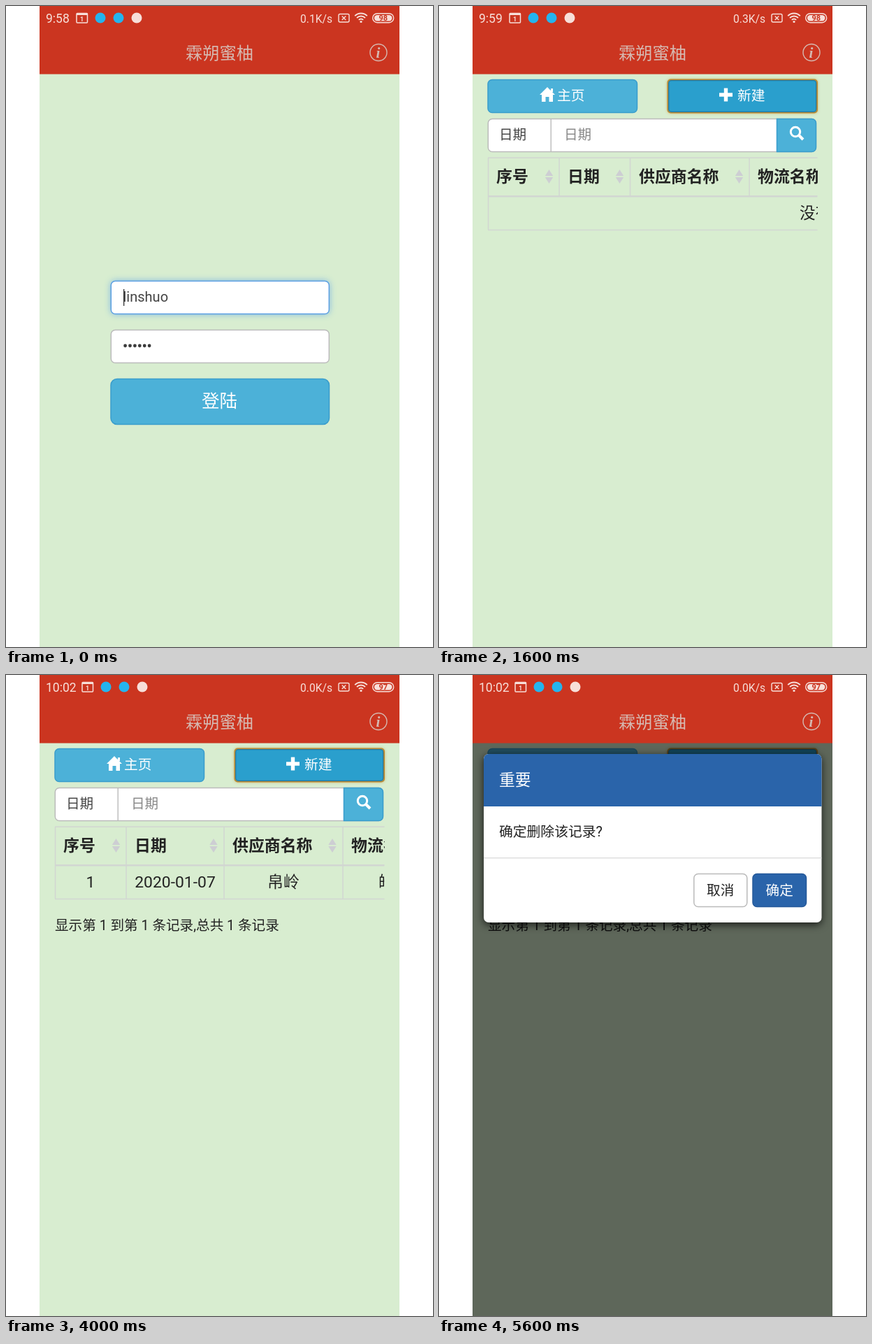
Write an HTML page with a canvas that moves like this. It is 611x917 px and loops after 6400 ms.

```html
<!DOCTYPE html>
<html lang="zh-CN">
<head>
<meta charset="utf-8">
<style>
  html, body { margin: 0; width: 100%; height: 100%; overflow: hidden; background: #fff; }
  canvas { display: block; width: 611px; height: 917px; }
</style>
</head>
<body>
<canvas id="stage" width="611" height="917"></canvas>
<script>
const ctx = document.getElementById('stage').getContext('2d');
const FONT = 'Roboto, "Noto Sans CJK SC", "Noto Sans CJK", sans-serif';
const RED = '#cb3520', PAGE = '#d8edd0', SKY = '#4cb1d8', SKY_EDGE = '#3a9dcc';
const BLUE = '#2a64aa', INK = '#222', SOFT = '#444', GRAY = '#bbb', GRID = '#d2d6d2';
const ERROR = '#933033', VALID = '#2b672c', STATUS = '#f7dfd9', TITLE = '#d6b9b1';
const STEP = 800;

// Text is placed by its vertical middle.
function text(str, x, cy, size, color = INK, { weight = 400, align = 'left' } = {}) {
  ctx.font = `${weight} ${size}px ${FONT}`;
  ctx.textAlign = align;
  ctx.fillStyle = color;
  ctx.fillText(str, x, cy + size * 0.37);
}
const centered = (str, x, cy, size, color, weight) =>
  text(str, x, cy, size, color, { weight, align: 'center' });

function rect(x, y, w, h, color) {
  ctx.fillStyle = color;
  ctx.fillRect(x, y, w, h);
}

function line(color, width, ...points) {
  ctx.strokeStyle = color;
  ctx.lineWidth = width;
  ctx.beginPath();
  points.forEach(([x, y]) => ctx.lineTo(x, y));
  ctx.stroke();
}

function shape(color, ...points) {
  ctx.fillStyle = color;
  ctx.beginPath();
  points.forEach(([x, y]) => ctx.lineTo(x, y));
  ctx.fill();
}

function disc(x, y, r, color) {
  ctx.fillStyle = color;
  ctx.beginPath();
  ctx.arc(x, y, r, 0, 7);
  ctx.fill();
}

function ring(x, y, r, color, width, from = 0, to = Math.PI * 2) {
  ctx.strokeStyle = color;
  ctx.lineWidth = width;
  ctx.beginPath();
  ctx.arc(x, y, r, from, to);
  ctx.stroke();
}

function box(x, y, w, h, r, fill, { edge, width = 1.5, glow, blur = 10, dy = 0 } = {}) {
  ctx.save();
  ctx.beginPath();
  ctx.roundRect(x, y, w, h, r);
  if (glow) Object.assign(ctx, { shadowColor: glow, shadowBlur: blur, shadowOffsetY: dy });
  if (fill) {
    ctx.fillStyle = fill;
    ctx.fill();
  }
  ctx.shadowColor = 'transparent';
  if (edge) {
    ctx.strokeStyle = edge;
    ctx.lineWidth = width;
    ctx.stroke();
  }
  ctx.restore();
}

function at(x, y, draw) {
  ctx.save();
  ctx.translate(x, y);
  draw();
  ctx.restore();
}

// Icons, drawn around their centre
const icons = {
  home() {
    shape('#fff', [0, -11], [11, 0], [8, 0], [8, 10], [2.5, 10], [2.5, 3], [-2.5, 3],
      [-2.5, 10], [-8, 10], [-8, 0], [-11, 0]);
    rect(5, -9, 3, 5, '#fff');
  },
  plus() {
    rect(-9.5, -2.7, 19, 5.4, '#fff');
    rect(-2.7, -9.5, 5.4, 19, '#fff');
  },
  search() {
    ring(-2, -2, 6.7, '#fff', 3);
    line('#fff', 4, [3, 3], [9, 9]);
  },
  cross(color, r, width) {
    line(color, width, [-r, -r], [r, r]);
    line(color, width, [-r, r], [r, -r]);
  },
  check() {
    line(VALID, 5.5, [-8.5, 0.5], [-3, 5.5], [8.5, -6]);
  },
  sort() {
    shape('#cdced3', [0, -10], [5.7, -1], [-5.7, -1]);
    shape('#cdced3', [0, 10], [5.7, 1], [-5.7, 1]);
  },
  pencil() {
    shape(BLUE, [-11, 11], [-9, 4], [-4, 9]);
    shape(BLUE, [-7.5, 2.5], [3, -7], [7, -3], [-2.5, 7.5]);
    shape(BLUE, [4.5, -8.5], [7, -11], [11.5, -6.5], [8.5, -4]);
  },
  trash() {
    box(-3.5, -11.5, 7, 4, 1, null, { edge: BLUE, width: 2 });
    rect(-10.5, -9, 21, 2.4, BLUE);
    box(-7.5, -6, 15, 17.5, 1, null, { edge: BLUE, width: 2.2 });
    for (const x of [-3.7, 0, 3.7]) rect(x - 0.8, -4, 1.6, 13, BLUE);
  },
};

function statusBar(clock, speed, battery) {
  const shift = { '10:01': 6, '10:02': 8 }[clock] || 0;
  text(clock, 57, 17.5, 17.5, STATUS);
  box(101 + shift, 10.5, 15.5, 13.5, 1, null, { edge: STATUS });
  rect(101 + shift, 10, 15.5, 3, STATUS);
  centered('1', 108.7 + shift, 18.7, 9, STATUS, 700);
  disc(135 + shift, 17, 7.5, '#25b4ee');
  disc(161 + shift, 17, 7.5, '#25b4ee');
  disc(187 + shift, 17, 7.5, STATUS);

  text(speed, 467, 17.8, 15.6, STATUS, { align: 'right' });
  box(476, 11.5, 15, 11.5, 2, null, { edge: STATUS, width: 1.4 });
  at(483.5, 17.2, () => icons.cross(STATUS, 2.7, 1.4));
  for (const r of [4.5, 8.5, 12.5])
    ring(508, 23, r, STATUS, 1.8, -Math.PI * 0.75, -Math.PI * 0.25);
  disc(508, 22.5, 1.6, STATUS);
  box(524.7, 10.7, 30, 13, 6.5, null, { edge: STATUS, width: 1.4 });
  box(527, 13, 25.4, 8.4, 4.2, STATUS);
  centered(battery, 539.7, 17.2, 11, RED, 700);
}

function header(clock, speed, battery) {
  rect(48, 0, 515, 97.5, RED);
  statusBar(clock, speed, battery);
  centered('霖朔蜜柚', 305.5, 67, 24.2, TITLE, 300);
  ring(533, 66.5, 12, TITLE, 1.4);
  ctx.font = 'italic 700 21px "Liberation Serif", serif';
  ctx.textAlign = 'center';
  ctx.fillStyle = TITLE;
  ctx.fillText('i', 532.5, 73.5);
}

function bigButton(label, y) {
  box(150, y + 0.5, 312.5, 65, 9, SKY, { edge: SKY_EDGE });
  centered(label, 305.5, y + 32, 25.5, '#fff', 300);
}

function login() {
  box(150.3, 393.5, 312, 47, 6, '#fff', { edge: '#5b9fe3', glow: 'rgba(90,160,235,.8)' });
  text('linshuo', 167.5, 416, 20, SOFT);
  rect(168, 405, 1.3, 24, '#333');
  box(150.3, 463.5, 312, 47, 6, '#fff', { edge: GRAY });
  for (let i = 0; i < 6; i++) disc(170.6 + i * 6.9, 486, 2.4, '#3c3c3c');
  bigButton('登陆', 533);
}

function menu() {
  ['进货管理', '出货管理', '库存查询', '统计报表', '退出登陆']
    .forEach((label, i) => bigButton(label, 290 + i * 88));
}

function toolbar() {
  box(70, 105.5, 213.5, 47, 6, SKY, { edge: SKY_EDGE });
  at(155, 127, icons.home);
  text('主页', 169, 128, 19.8, '#fff');
  box(327.5, 105.5, 213.5, 47, 4, '#2a9fcd', { edge: '#b98a33', width: 2, glow: 'rgba(190,130,20,.8)', blur: 4 });
  box(328.7, 106.7, 211, 44.6, 4, null, { edge: '#2279a2', width: 1.2 });
  at(410.5, 127, icons.plus);
  text('新建', 427, 128, 19.8, '#fff');

  box(70.3, 161.5, 469, 47, 6, '#fff', { edge: GRAY });
  rect(159.5, 162, 1.4, 46, GRAY);
  text('日期', 86, 184, 19.6, SOFT);
  text('日期', 179, 184, 19.6, '#888');
  box(483.5, 161.5, 56, 47, [0, 6, 6, 0], SKY, { edge: SKY_EDGE });
  at(512, 182, icons.search);
}

// columns: [title, title x, sort arrow x or 0]
function table(columns, dividers, drawRow, rowDividers) {
  ctx.save();
  ctx.beginPath();
  ctx.rect(69, 215, 473, 108);
  ctx.clip();
  rect(70, 216.4, 471.5, 1.5, GRID);
  rect(70, 271, 471.5, 2.5, GRID);
  rect(70, 319.7, 471.5, 1.5, GRID);
  for (const x of dividers) rect(x - 0.7, 217, 1.5, rowDividers ? 103 : 55, GRID);
  if (!rowDividers) rect(69.8, 217, 1.5, 103, GRID);
  for (const [title, x, sortX] of columns) {
    text(title, x, 244, 22.9, INK, { weight: 700 });
    if (sortX) at(sortX, 244, icons.sort);
  }
  drawRow();
  ctx.restore();
}

const cell = (str, x) => centered(str, x, 296, 22.9, INK);
const summary = () => text('显示第 1 到第 1 条记录,总共 1 条记录', 70, 358, 19.6, INK);

function emptyList() {
  toolbar();
  table([['序号', 82, 157.5], ['日期', 184, 258.5], ['供应商名称', 286, 429.5], ['物流名称', 456, 0]],
    [172, 273.5, 444], () => text('没有找到匹配的记录', 516, 296, 22.5, INK));
}

function listStart() {
  toolbar();
  table([['序号', 82, 157.5], ['日期', 184, 297], ['供应商名称', 324, 467], ['物流名称', 494, 0]],
    [70.5, 172, 312, 482], () => {
      cell('1', 121);
      cell('2020-01-07', 242);
      cell('帛岭', 397);
      cell('皓舟', 556);
    }, true);
  summary();
}

function listEnd() {
  toolbar();
  table([['件数', 78, 153], ['净重', 180, 254.5], ['单价', 281.5, 356], ['合计', 383, 457.5], ['操作', 484, 0]],
    [167.5, 269, 370.5, 472, 541], () => {
      cell('658', 116.5);
      cell('3.5', 218);
      cell('4.6', 320);
      cell('0', 421);
      at(491, 294, icons.pencil);
      at(521.5, 293.5, icons.trash);
    }, true);
  summary();
}

const dim = () => rect(48, 97, 515, 820, 'rgba(0,0,0,.565)');

function sheet(y, h) {
  box(64, y, 483.5, h, 7, '#fff', { glow: 'rgba(0,0,0,.75)', blur: 12, dy: 3 });
}

function field(y, label, { tone, value = '', mark, help, focus, date } = {}) {
  if (label) text(label, 86, y - 27, 25.6, tone || INK, { weight: 700 });
  box(85.8, y + 0.7, 439.2, 47, 6, '#fff',
    { edge: focus ? '#1f4f22' : tone || GRAY, width: focus ? 1.9 : 1.6, glow: focus && 'rgba(80,170,80,.9)' });
  text(value, date ? 109.5 : 104, y + 24.5, 25.6, SOFT);
  if (focus) rect(103.6, y + 10, 1.5, 29, '#333');
  if (date) shape('#333', [508.5, y + 20], [517.5, y + 20], [513, y + 29]);
  if (mark === 'check') at(502, y + 24, icons.check);
  if (mark === 'cross') at(501.5, y + 23, () => icons.cross(ERROR, 6.5, 5.2));
  if (help) text('请填写必填项目', 86, y + 67, 16.9, ERROR);
}

const TAIL = ['件数', '净重(斤)', '单价(元/斤)'];

function formErrors() {
  dim();
  sheet(60, 880);
  const missing = { tone: ERROR, mark: 'cross', help: true };
  field(102, '', { ...missing, date: true });
  field(224, '供应商名称', missing);
  field(367, '物流名称', missing);
  field(489, '规格', { tone: ERROR });
  [602, 694, 807].forEach((y, i) => field(y, TAIL[i], { tone: VALID, value: '0', mark: 'check' }));
  rect(64, 898, 483.5, 1.4, '#ddd');
}

function formFilled() {
  emptyList();
  dim();
  sheet(112.5, 840);
  text('货物信息', 86, 151, 25.5, INK);
  at(517.5, 144, () => icons.cross('#bcbcbc', 5.6, 3.2));
  rect(64, 191, 483.5, 1.4, '#ddd');
  const valid = { tone: VALID, mark: 'check' };
  field(257, '日期', { ...valid, value: '2020/01/07', date: true });
  field(349, '供应商名称', { ...valid, value: '帛岭' });
  field(462, '物流名称', { ...valid, value: '皓舟' });
  field(554, '规格', { tone: VALID, focus: true });
  [667, 759, 872].forEach((y, i) => field(y, TAIL[i], { value: '0' }));
}

function confirmDelete() {
  listEnd();
  dim();
  sheet(113, 241);
  box(64, 113, 483.5, 75, [7, 7, 0, 0], BLUE);
  text('重要', 86, 150, 22.8, '#fff');
  text('确定删除该记录?', 86, 224, 19.8, INK);
  rect(64, 261, 483.5, 1.4, '#ddd');
  box(364.8, 284.5, 76, 47, 6, '#fff', { edge: GRAY });
  centered('取消', 402.7, 307.5, 19.6, INK);
  box(449, 284.5, 76.5, 47, 6, BLUE, { edge: '#265a9a' });
  centered('确定', 487.2, 307.5, 19.6, '#fff');
}

const screens = [
  [login, '9:58', '0.1K/s', '98'],
  [menu, '9:58', '0.2K/s', '98'],
  [emptyList, '9:59', '0.3K/s', '98'],
  [formErrors, '9:59', '0.3K/s', '98'],
  [formFilled, '10:01', '0.0K/s', '97'],
  [listStart, '10:02', '0.0K/s', '97'],
  [listEnd, '10:02', '0.1K/s', '97'],
  [confirmDelete, '10:02', '0.0K/s', '97'],
];

function draw(time) {
  const [content, ...status] = screens[Math.floor(time / STEP) % screens.length];
  rect(0, 0, 611, 917, '#fff');
  ctx.save();
  ctx.beginPath();
  ctx.rect(48, 0, 515, 917);
  ctx.clip();
  rect(48, 0, 515, 917, PAGE);
  content();
  header(...status);
  ctx.restore();
}

const start = performance.now();
function loop() {
  draw(performance.now() - start);
  requestAnimationFrame(loop);
}
loop();
</script>
</body>
</html>
```
